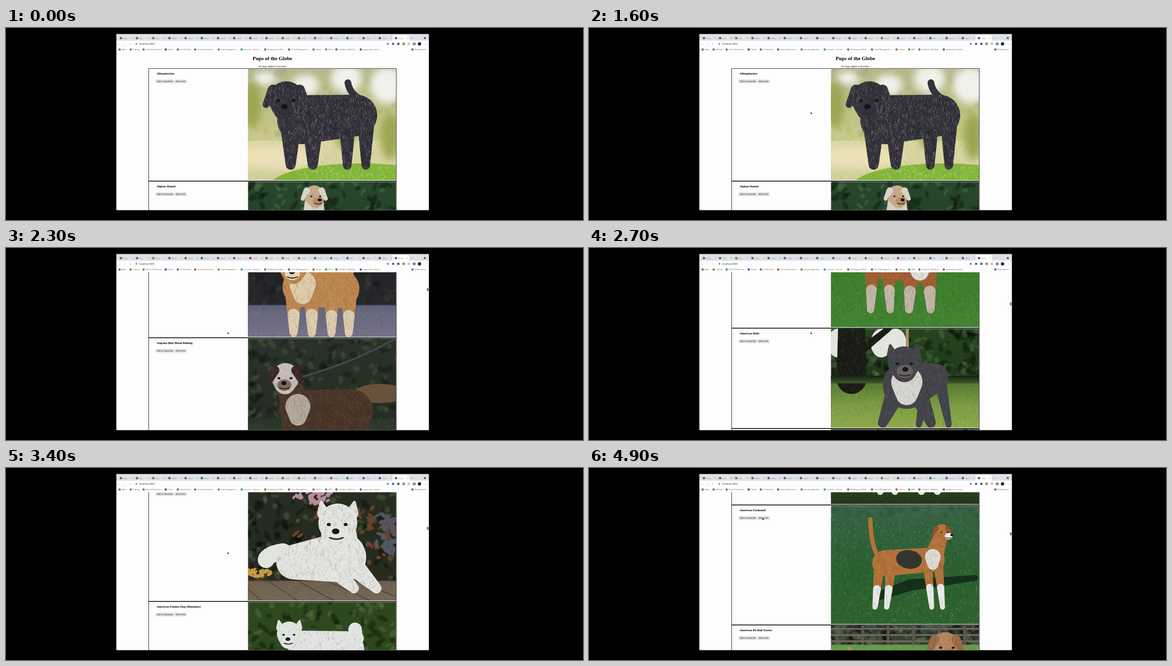
Recreate the animation shown at these times as an HTML page with a canvas. Size 1200x400 px, loop 5 s.

```html
<!DOCTYPE html>
<html lang="en">
<head>
<meta charset="utf-8">
<title>Dog list</title>
<style>
html, body { margin: 0; width: 100%; height: 100%; overflow: hidden; background: #000; }
canvas { display: block; width: 1200px; height: 400px; }
</style>
</head>
<body>
<canvas id="stage" width="1200" height="400"></canvas>
<script>
const LOOP = 5000, STEP = 100, PHOTO_W = 309;
const SANS = '"Open Sans", Arial, sans-serif', SERIF = '"Liberation Serif", serif';
const screen = document.getElementById('stage').getContext('2d');
let g = screen, seed = 1;

const rand = () => (seed = (seed * 16807) % 2147483647) / 2147483647;
const mix = (a, b, k) => a + (b - a) * k;
const white = a => `rgba(255,255,235,${a})`;
const black = a => `rgba(0,0,0,${a})`;

// Smooth 0 to 1 from time t0 to t1.
function ease(t, t0, t1) {
  const k = Math.min(1, Math.max(0, (t - t0) / (t1 - t0)));
  return k * k * (3 - 2 * k);
}

function box(color, x, y, w, h, r = 0) {
  g.fillStyle = color;
  g.beginPath();
  g.roundRect(x, y, w, h, r);
  g.fill();
}

function dot(color, x, y, rx, ry = rx, turn = 0) {
  g.fillStyle = color;
  g.beginPath();
  g.ellipse(x, y, rx, ry, turn, 0, 7);
  g.fill();
}

function label(str, x, y, size, color = '#444', family = SANS, weight = 400, align = 'left') {
  g.font = `${weight} ${size}px ${family}`;
  g.fillStyle = color;
  g.textAlign = align;
  g.fillText(str, x, y);
}

function curve(color, width, [x0, y0], [cx, cy], [x1, y1]) {
  g.strokeStyle = color;
  g.lineWidth = width;
  g.lineCap = 'round';
  g.beginPath();
  g.moveTo(x0, y0);
  g.quadraticCurveTo(cx, cy, x1, y1);
  g.stroke();
}

function flecks(color, n, x, y, w, h, len) {
  g.strokeStyle = color;
  g.lineWidth = 1;
  g.beginPath();
  while (n-- > 0) {
    const a = x + rand() * w, b = y + rand() * h;
    g.moveTo(a, b);
    g.lineTo(a + (rand() - 0.5) * len, b + len * rand());
  }
  g.stroke();
}

function leaves(color, n, x, y, w, h, size) {
  while (n-- > 0)
    dot(color, x + rand() * w, y + rand() * h, size * (0.5 + rand()), size * (0.3 + rand() * 0.5), rand() * 3);
}

function fade(y, h, colors) {
  const f = g.createLinearGradient(0, y, 0, y + h);
  colors.forEach((c, i) => f.addColorStop(i / Math.max(1, colors.length - 1), c));
  box(f, 0, y, PHOTO_W, h);
}

// Tapered limb around two circles, with a hint of coat.
function limb(color, [x0, y0, r0], [x1, y1, r1], shag = 0.08) {
  const a = Math.atan2(y1 - y0, x1 - x0);
  const o = Math.acos(Math.max(-1, Math.min(1, (r0 - r1) / Math.hypot(x1 - x0, y1 - y0))));
  g.save();
  g.fillStyle = color;
  g.beginPath();
  g.arc(x0, y0, r0, a + o, a - o);
  g.arc(x1, y1, r1, a - o, a + o);
  g.fill();
  g.clip();
  const r = Math.max(r0, r1), x = Math.min(x0, x1) - r, y = Math.min(y0, y1) - r;
  const w = Math.abs(x1 - x0) + 2 * r, h = Math.abs(y1 - y0) + 2 * r;
  for (const tone of [white(shag), black(shag * 1.5)]) flecks(tone, w * h / 35, x, y, w, h, 9);
  g.restore();
}

function dog(opts) {
  const d = {
    shoulder: [110, 105, 40], hip: [215, 108, 36], head: [85, 60, 32], floor: 205, spread: 0.45, reach: 0,
    coat: '#777', look: -0.1, tailWidth: 9, ...opts
  };
  const { shoulder, hip, head, floor, coat, shag, look } = d;
  const { socks = coat, face = coat, muzzle = face, ear = face, neck = coat } = d;
  const [hx, hy, r] = head, dir = Math.sign(shoulder[0] - hip[0]);

  if (d.tail) {
    const [tx, ty] = d.tail, root = [hip[0] - dir * hip[2] * 0.6, hip[1] - hip[2] * 0.6];
    curve(coat, d.tailWidth, root, [mix(root[0], tx, 0.9), mix(root[1], ty, 0.3)], d.tail);
  }
  const leg = ([x, y, s], side, shift) => {
    const top = [x + side * s * 0.45, y + s * 0.3, s * 0.42], foot = [x + side * s * d.spread + shift, floor - s * 0.2, s * 0.2];
    limb(coat, top, foot, shag);
    limb(socks, top.map((v, i) => mix(v, foot[i], 0.55)), foot, shag);
  };
  for (const side of [-1, 1]) {
    if (!d.lying) leg(hip, side, -dir * d.reach);
    leg(shoulder, side, dir * d.reach);
  }
  limb(coat, hip, shoulder, shag);
  if (d.saddle) dot(d.saddle, mix(hip[0], shoulder[0], 0.5), mix(hip[1], shoulder[1], 0.5) - 4, hip[2], hip[2] * 0.72, 0.15);
  limb(neck, [hx, hy, r * 0.75], [shoulder[0], shoulder[1], shoulder[2] * 0.8], shag);
  if (d.chest) limb(d.chest, [shoulder[0], shoulder[1] - 6, shoulder[2] * 0.65], [shoulder[0], shoulder[1] + shoulder[2] * 0.4, shoulder[2] * 0.45]);
  limb(face, [hx, hy - r * 0.12, r * 0.88], [hx + look * r * 0.3, hy + r * 0.3, r * 0.66], shag);
  for (const side of [-1, 1]) {
    const tip = d.flop ? [1, 0.15, 0.17] : [0.75, -1.05, 0.07];
    limb(ear, [hx + side * r * 0.65, hy - r * 0.55, r * 0.28], [hx + side * r * tip[0], hy + r * tip[1], r * tip[2]], shag);
    dot('#17151a', hx + side * r * 0.38 + look * r * 0.25, hy - r * 0.05, r * 0.09, r * 0.07);
  }
  const mx = hx + look * r * 0.65, my = hy + r * 0.38;
  dot(muzzle, mx, my, r * 0.45, r * 0.36);
  dot('#17151a', mx + look * r * 0.3, my - r * 0.12, r * 0.17, r * 0.13);
  curve('#3a2826', r * 0.07, [mx - r * 0.3, my + r * 0.17], [mx, my + r * 0.3], [mx + r * 0.3, my + r * 0.17]);
}

// Soft backdrop and textured ground.
function scene(h, { back, ground, horizon, dapple = 0.25 }) {
  g.filter = 'blur(1px)';
  fade(0, h, back);
  leaves(black(dapple * 1.3), 80, 0, 0, PHOTO_W, horizon, 9);
  leaves(`rgba(125,150,105,${dapple})`, 70, 0, 0, PHOTO_W, horizon, 8);
  fade(horizon, h - horizon, ground);
  g.filter = 'none';
  const n = (h - horizon) * 5;
  flecks(white(0.17), n, 0, horizon, PHOTO_W, h, 6);
  flecks(black(0.2), n, 0, horizon, PHOTO_W, h, 6);
}

function bokeh() {
  g.filter = 'blur(8px)';
  for (let i = 0; i < 4; i++) {
    dot('#f1f1ec', 35 + i * 85, 20 + (i % 2) * 14, 24 + i * 4, 14 + i * 8);
    dot('#9ca552', 8 + i * 96, 75 + i * 22, 20, 48);
  }
  dot('#ebe0b8', 60, 185, 90, 24);
  g.filter = 'none';
  dot('#82b53c', 235, 245, 190, 48);
  flecks('#b2d667', 240, 100, 201, 209, 32, 6);
}

function trunk() {
  for (const x of [15, 105, 135]) dot('#e2e4df', x, 30, 22, 30);
  limb('#191b16', [43, 0, 28], [43, 105, 31]);
  limb('#191b16', [55, 52, 9], [120, 0, 6]);
  box('#b08e62', 156, 0, 6, 40);
  fade(98, 16, ['#152313', '#3d5829']);
}

function garden() {
  leaves('#6d4029', 70, 90, 55, 219, 130, 7);
  leaves('#b68b9c', 30, 95, 22, 78, 24, 6);
  leaves('#555562', 30, 265, 70, 44, 80, 8);
  leaves('#c99c42', 30, 0, 184, 48, 14, 5);
  for (let i = 0; i < 5; i++) curve('#453d33', 1.5, [i * 60 - 20, 205], [i * 68, 225], [i * 76 + 30, 250]);
}

function fence() {
  for (let i = 0; i < 6; i++) {
    box('#5b574c', 10 + i * 53, 0, 6, 40);
    if (i < 3) box('#6c665b', 0, 5 + i * 13, PHOTO_W, 4);
  }
}

function shadow() {
  limb('#14301b', [95, 190, 9], [165, 166, 12], 0);
  limb('#14301b', [165, 166, 12], [300, 151, 6], 0);
}

function rope() {
  curve('#40494a', 4, [115, 80], [220, 50], [PHOTO_W, 0]);
  dot('#66523d', 275, 115, 55, 20);
}

const passing = (name, h) => ({ name, h });
const rows = [
  { name: 'Affenpinscher', h: 235, back: ['#b5b78b', '#c6c786', '#d6d39c'], ground: ['#ddd7a6', '#d0cf99'], horizon: 150, dapple: 0.03, extra: bokeh,
    dog: { coat: '#34333c', shoulder: [112, 106, 51], hip: [226, 97, 43], head: [80, 68, 42], floor: 210, tail: [208, 29], tailWidth: 14, shag: 0.2, flop: true } },
  { name: 'Afghan Hound', h: 207, back: ['#28492c', '#1d3420'], ground: ['#345c2c'], horizon: 180,
    dog: { coat: '#d8d0c5', muzzle: '#b98f68', face: '#c7aa8b', shoulder: [137, 115, 36], hip: [180, 130, 36], head: [138, 32, 24], floor: 200, flop: true, ear: '#ddd5ca', look: 0.5 } },
  passing('African Hunting Dog', 232),
  passing('Airedale Terrier', 232),
  passing('Akbash Dog', 232),
  { name: 'Akita', h: 219, back: ['#202124', '#2b2c2e'], ground: ['#62637a', '#77738a'], horizon: 150, dapple: 0.1,
    dog: { coat: '#bc864f', socks: '#decbad', chest: '#e0caa7', shoulder: [114, 112, 42], hip: [192, 116, 40], head: [95, 72, 35], floor: 216, tail: [215, 50], muzzle: '#e6d3b5' } },
  { name: 'Alapaha Blue Blood Bulldog', h: 260, back: ['#2a3329', '#222922'], ground: ['#283329', '#3e5437'], horizon: 165, dapple: 0.18, extra: rope,
    dog: { coat: '#493528', socks: '#a69a8c', chest: '#b2a799', face: '#c6beb6', muzzle: '#806b60', ear: '#392821', shoulder: [104, 148, 40], hip: [214, 152, 46], head: [78, 85, 33], floor: 250, flop: true } },
  passing('Alaskan Husky', 300),
  passing('Alaskan Malamute', 300),
  { name: 'American Bulldog', h: 260, back: ['#477f33'], ground: ['#387d28', '#438332'], horizon: 90, dapple: 0.08,
    dog: { coat: '#a15f34', socks: '#c1b5a6', chest: '#dfdfda', shoulder: [185, 125, 41], hip: [103, 118, 37], head: [225, 62, 34], floor: 228, spread: 0.55 } },
  { name: 'American Bully', h: 209, back: ['#26441f', '#192c18'], ground: ['#57792f', '#7c9c43', '#8eab4b'], horizon: 112, extra: trunk,
    dog: { coat: '#43434a', chest: '#d7d5d0', muzzle: '#67625f', shoulder: [158, 117, 50], hip: [214, 103, 31], head: [152, 75, 38], floor: 206, spread: 1, look: 0.08 } },
  { name: 'American Eskimo Dog', h: 251, back: ['#292e20', '#232c20', '#30291f'], ground: ['#6d604f', '#776957'], horizon: 207, extra: garden,
    dog: { coat: '#e3e4df', shoulder: [194, 158, 52], hip: [95, 168, 36], head: [187, 92, 46], floor: 233, reach: 50, lying: true, tail: [38, 163], tailWidth: 35, shag: 0.1 } },
  { name: 'American Eskimo Dog (Miniature)', h: 234, back: ['#2d481e', '#30481f'], ground: ['#2d481e', '#23371a'], horizon: 170,
    dog: { coat: '#e1e4e0', shoulder: [118, 94, 34], hip: [205, 98, 37], head: [86, 70, 29], floor: 212, tail: [223, 57], tailWidth: 28 } },
  { name: 'American Foxhound', h: 250, back: ['#3a6547'], ground: ['#356340', '#2a6030', '#2f632d'], horizon: 25, dapple: 0.03, extra: shadow,
    dog: { coat: '#b27239', saddle: '#34352f', socks: '#e7e8e8', chest: '#dedbd5', muzzle: '#eee', ear: '#8c522b', shoulder: [212, 113, 25], hip: [113, 120, 27], head: [231, 57, 18], floor: 217, reach: 9, tail: [82, 29], flop: true, look: 1.2 } },
  { name: 'American Pit Bull Terrier', h: 250, back: ['#343e35', '#46503c'], ground: ['#659b4a', '#5d913e'], horizon: 40, extra: fence,
    dog: { coat: '#b58760', muzzle: '#a4714d', ear: '#9b6945', shoulder: [200, 110, 37], hip: [87, 112, 34], head: [238, 48, 34], floor: 225, tail: [38, 49], flop: true, look: 0.4 } }
];

function takePhoto(row, i) {
  const c = document.createElement('canvas');
  c.width = PHOTO_W;
  c.height = row.h - 3;
  g = c.getContext('2d');
  seed = 91 + i * 37;
  const hue = 60 + i * 25;
  scene(row.h, { back: [`hsl(${hue} 20% 35%)`], ground: [`hsl(${hue} 25% 42%)`], horizon: 120, ...row });
  if (row.extra) row.extra();
  dog(row.dog || { coat: `hsl(30 ${i * 4}% ${30 + i * 5}%)` });
  row.pic = c;
}

function button(str, x, y, w) {
  box('#e4e4e4', x, y, w, 8.5, 2.5);
  label(str, x + w / 2, y + 5.8, 4.5, '#222', SANS, 400, 'center');
}

function page(scroll) {
  g.save();
  g.beginPath();
  g.rect(229.5, 50, 650, 329.5);
  g.clip();
  box('#fdfdfd', 229, 50, 651, 330);
  label('Pups of the Globe', 554, 67 - scroll, 10.8, '#000', SERIF, 700, 'center');
  label('No dogs added to favorites', 554, 82 - scroll, 5.4, '#222', SERIF, 400, 'center');
  let y = 84 - scroll;
  for (const { name, h, pic } of rows) {
    if (y < 382 && y + h > 48) {
      g.drawImage(pic, 503, y + 1);
      for (const x of [296, 811]) box('#555', x, y, 1.3, h);
      for (const edge of [y, y + h - 1]) box('#333', 296, edge, 516, 1);
      label(name, 313, y + 12.6, 6.2, '#000', SERIF, 700);
      button('Add to Favorites', 311, y + 23, 39);
      button('More Info', 350.5, y + 23, 25.5);
    }
    y += h;
  }
  if (scroll) box('#858585', 875, 50 + scroll / 38, 4, 7, 2);
  g.restore();
}

const tabs = 'Repo Dev Java Notes Video Build Guide Tasks Think Index Daily Scroll HTTP Query API Times React React'.split(' ');
const marks = ['Apps', 'Coding', 'Event Production', 'Home', 'Productivity', 'form.submission…', 'quietnewgarden…', 'Lessons - Housin…',
  'Reading and Writ…', 'Time Managemen…', 'Career', 'ADS', 'Untitled - Mobility…', 'pages-per-minute…'];

function chrome() {
  box('#dee1e6', 229.5, 12.5, 650, 15);
  box('#fdfdfd', 229.5, 26.5, 650, 24);
  box('#fff', 804, 15, 34, 13, 2);
  tabs.forEach((str, i) => {
    const x = 239 + i * 33.65;
    dot(`hsl(${i * 40} ${i % 3 * 14}% 40%)`, x, 21, 2.6);
    label(str, x + 5, 22.5, 4, '#777');
    label('×', x + 22, 22.7, 5, '#666');
    box('#b5b8bd', x + 28, 18, 0.5, 6);
  });
  label('+', 843, 23, 6, '#666');
  dot('#5d6064', 871, 21, 2.3);
  '←→↻'.split('').forEach((s, i) => label(s, 233 + i * 11.5, 35, 5, '#aaa', '"DejaVu Sans", sans-serif'));
  dot('#777', 271, 33, 1.7);
  label('localhost:3000', 277, 34.7, 4.7, '#333');
  ['#777', '#2e45ca', '#426154', '#b98047', '#ccc', '#8a8d91', '#222932'].forEach((c, i) => dot(c, 794 + i * 11, 33, 2 + i * 0.25));
  label('⋮', 870, 35, 5, '#555');
  let x = 234;
  marks.forEach((str, i) => {
    box(`hsl(${i * 75} ${i % 4 * 16}% 45%)`, x, 42.4, 4.5, 4.5, 1.5);
    label(str, x + 7, 46.3, 4.1, '#555');
    x += g.measureText(str).width + 13.5;
  });
  box('#777', 843, 42.4, 4.5, 4.5, 1);
  label('Reading List', 850, 46.3, 4.1, '#555');
}

// Two flicks down, then a short way back.
const scrollAt = t => Math.round(2508 * ease(t, 1761, 2839) + 729 * ease(t, 3278, 3600) - 59 * ease(t, 4200, 4700));

function pointer(t) {
  const arrive = ease(t, 1000, 1300), aim = ease(t, 4300, 4800);
  const x = mix(mix(478, 461, arrive), 361, aim), y = mix(mix(205, 175, arrive), 104, aim);
  g.fillStyle = '#111';
  g.beginPath();
  for (const [dx, dy] of [[0, 0], [3, 3], [2, 3.2], [2.5, 5], [1, 3.6], [0, 4.4]]) g.lineTo(x + dx, y + dy);
  g.fill();
}

rows.forEach(takePhoto);
const start = performance.now();
function draw() {
  const t = Math.floor((performance.now() - start) % LOOP / STEP) * STEP;
  g = screen;
  box('#000', 0, 0, 1200, 400);
  page(scrollAt(t));
  chrome();
  if (t >= 1000) pointer(t);
  requestAnimationFrame(draw);
}
draw();
</script>
</body>
</html>
```
